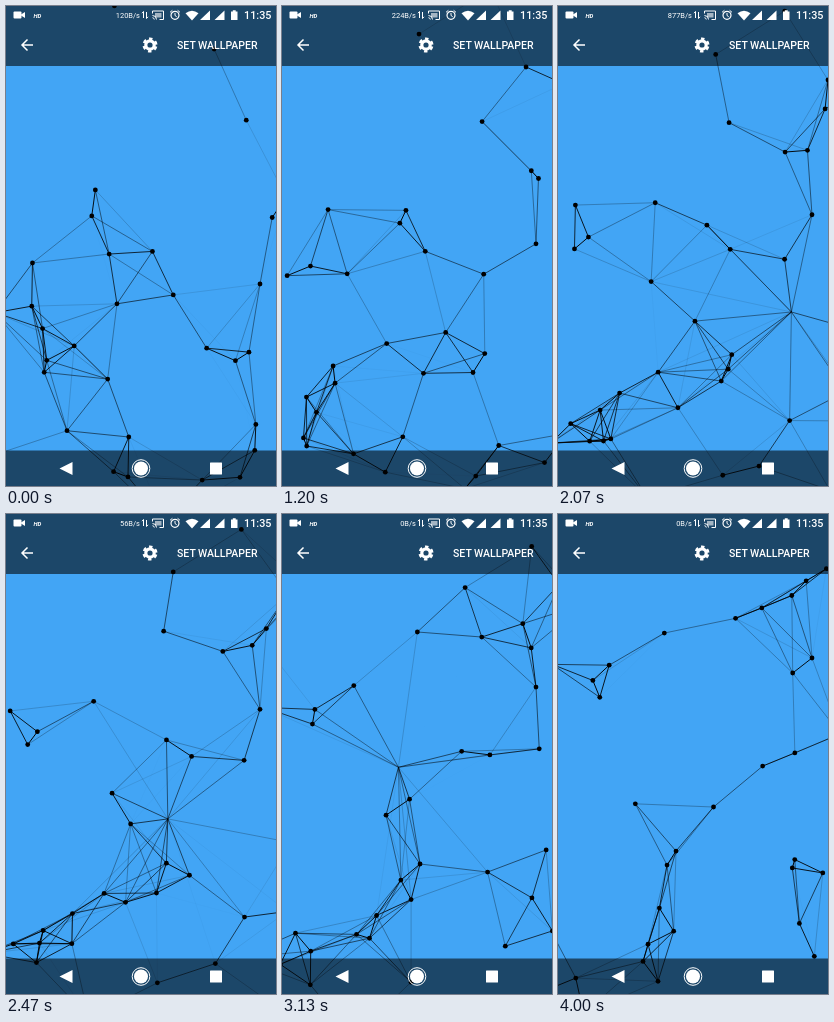
An HTML page with a canvas for the animation above (4070 ms loop, 270x480 px).

```html
<!DOCTYPE html>
<html lang="en">
<head>
<meta charset="utf-8">
<title>Network wallpaper</title>
<style>
  html, body { margin: 0; width: 100%; height: 100%; overflow: hidden; background: #42a5f5; }
  canvas, svg { position: absolute; left: 0; top: 0; width: 270px; height: 480px; display: block; }
  text { font-family: Roboto, "Open Sans", sans-serif; fill: #fff; }
  .medium { font-weight: 500; font-size: 10.5px; }
  .line { fill: none; stroke: #fff; }
</style>
</head>
<body>
<canvas id="net"></canvas>
<svg viewBox="0 0 270 480" fill="#fff">
  <g fill="#000" fill-opacity=".57">
    <rect width="270" height="60"/>
    <rect y="444.5" width="270" height="35.5"/>
  </g>

  <!-- status bar -->
  <rect x="7.500" y="5.500" width="8" height="7" rx="1"/>
  <path d="M15 8.500l4-2.500v6l-4-2.500z"/>
  <text x="27.500" y="11.500" font-size="6" font-weight="700" font-style="italic">HD</text>
  <text id="rate" x="134" y="12" font-size="7.500" text-anchor="end">120B/s</text>
  <path class="line" d="M137.500 12V5.500M136 7.200l1.500-1.700M140.500 6v6.500M142 10.800l-1.500 1.700"/>
  <path class="line" d="M146.500 7.500V5h11v8.500h-4M146.500 9.500a4 4 0 0 1 4 4M146.500 11.700a2 2 0 0 1 1.800 1.800"/>
  <rect x="149" y="7" width="6.500" height="4.500" fill-opacity=".6"/>
  <circle class="line" cx="169" cy="9.300" r="4" stroke-width="1.200"/>
  <path class="line" d="M169 7v2.500l1.700 1.200M164 6.300l2.400-2M174 6.300l-2.400-2"/>
  <path d="M179.500 7.200q6.500-5 13 0L186 14.500z"/>
  <path d="M194 14h10V4.500zM208.500 14h10V4.500z"/>
  <path d="M225 5.500h1.800v-1.200h2.900v1.200h1.800V14H225z"/>
  <text class="medium" x="238" y="13" style="font-size:10.800px">11:35</text>

  <!-- toolbar -->
  <path class="line" d="M27 39H16M21.500 33.500L16 39l5.500 5.500" stroke-width="1.500"/>
  <circle class="line" cx="144" cy="39" r="4.200" stroke-width="3.200"/>
  <circle class="line" cx="144" cy="39" r="6" stroke-width="3" stroke-dasharray="3.300 2.983" stroke-dashoffset="-1.490"/>
  <text class="medium" x="171" y="43">SET WALLPAPER</text>

  <!-- navigation -->
  <path d="M53.500 462.500l13-6.500v13z"/>
  <circle cx="135" cy="462.500" r="7"/>
  <circle class="line" cx="135" cy="462.500" r="8.800" stroke-width="1"/>
  <rect x="204" y="456.500" width="12" height="12" rx=".5"/>
</svg>
<script>
const W = 270, H = 480, LOOP = 4070, FPS = 15;
const SPEED = 33.5, MID = 2, MARGIN = 45, REACH = 92, TOUCH_REACH = 155;

// x, y at MID seconds, and heading in degrees
const dots = [
  [173.3, 116.6, 177.9], [268, 73, 26.6], [254, 211, -90], [250, 146.5, -104],
  [228.8, 147.5, -139.9], [268.2, 101, 120], [156.1, 46.9, 44.6], [225.3, 3.4, 50],
  [314.6, 75.5, -172.6], [147, 218, 30.6], [19.6, 199.4, -171], [98.8, 198.3, -135.3],
  [170, 243.5, -3.9], [224.7, 254.4, -31], [100.5, 364, 99], [91, 275, 15.6],
  [30.3, 233.3, -86.1], [15.6, 245, -67], [-42, 94, 57.3], [168, 363.5, -8.2],
  [139, 316, -157], [176, 348.6, 177.9], [165.4, 374.4, 162.9], [60.8, 385, 68.8],
  [43, 402, 112.1], [13.6, 415.6, 113.9], [31.9, 433, 95.4], [-4.9, 436.7, 169.7],
  [90.3, 489.6, 119], [50.7, 433.5, -14.1], [47.5, 436, -153.7], [120, 404, -91.7],
  [230.5, 416.5, -59.2], [167, 469.3, -178.3], [271, 482, 71.6], [309.5, 416, -25],
  [199.6, 461.8, -51.4], [288.8, 383.7, 119], [300, 323.4, 160.7]
];

// seconds, x, y of the dragging finger
const drag = [[1.86, 258, 306], [2.07, 233, 306], [2.8, 102, 304], [3.47, 131, 202], [3.7, 141, 167]];
const rates = [[0, 120], [0.5, 224], [1.35, 877], [2.2, 56], [3.05, 0]];

const canvas = document.getElementById("net");
const rate = document.getElementById("rate");
const ctx = canvas.getContext("2d");
const ratio = window.devicePixelRatio || 1;
canvas.width = W * ratio;
canvas.height = H * ratio;
ctx.scale(ratio, ratio);

function place([x, y, deg], t) {
  const a = deg * Math.PI / 180, d = SPEED * (t - MID);
  return { x: x + Math.cos(a) * d, y: y + Math.sin(a) * d };
}

function near(p) {
  return p.x > -MARGIN && p.x < W + MARGIN && p.y > -MARGIN && p.y < H + MARGIN;
}

function finger(t) {
  for (let i = 1; i < drag.length; i++) {
    const [t0, x0, y0] = drag[i - 1], [t1, x1, y1] = drag[i];
    if (t >= t0 && t < t1) {
      const k = (t - t0) / (t1 - t0);
      return { x: x0 + (x1 - x0) * k, y: y0 + (y1 - y0) * k };
    }
  }
  return null;
}

function link(a, b, reach, strength) {
  const q = Math.hypot(a.x - b.x, a.y - b.y) / reach;
  if (q >= 1) return;
  ctx.globalAlpha = strength * (1 - q * q);
  ctx.beginPath();
  ctx.moveTo(a.x, a.y);
  ctx.lineTo(b.x, b.y);
  ctx.stroke();
}

function draw(t) {
  ctx.globalAlpha = 1;
  ctx.fillStyle = "#42a5f5";
  ctx.fillRect(0, 0, W, H);
  ctx.fillStyle = ctx.strokeStyle = "#000";
  ctx.lineWidth = 1;

  const points = dots.map(d => place(d, t)).filter(near);
  const touch = finger(t);
  points.forEach((p, i) => {
    for (let j = 0; j < i; j++) link(p, points[j], REACH, 1);
    if (touch) link(p, touch, TOUCH_REACH, 0.7);
  });

  ctx.globalAlpha = 1;
  for (const p of points) {
    ctx.beginPath();
    ctx.arc(p.x, p.y, 2.4, 0, Math.PI * 2);
    ctx.fill();
  }
  rate.textContent = rates.filter(r => r[0] <= t).pop()[1] + "B/s";
}

const start = performance.now();
let shown = -1;
function tick() {
  const ms = (performance.now() - start) % LOOP;
  const step = Math.min(60, Math.floor((ms + 3.4) * FPS / 1000));
  if (step !== shown) draw((shown = step) / FPS);
  requestAnimationFrame(tick);
}
tick();
</script>
</body>
</html>
```
